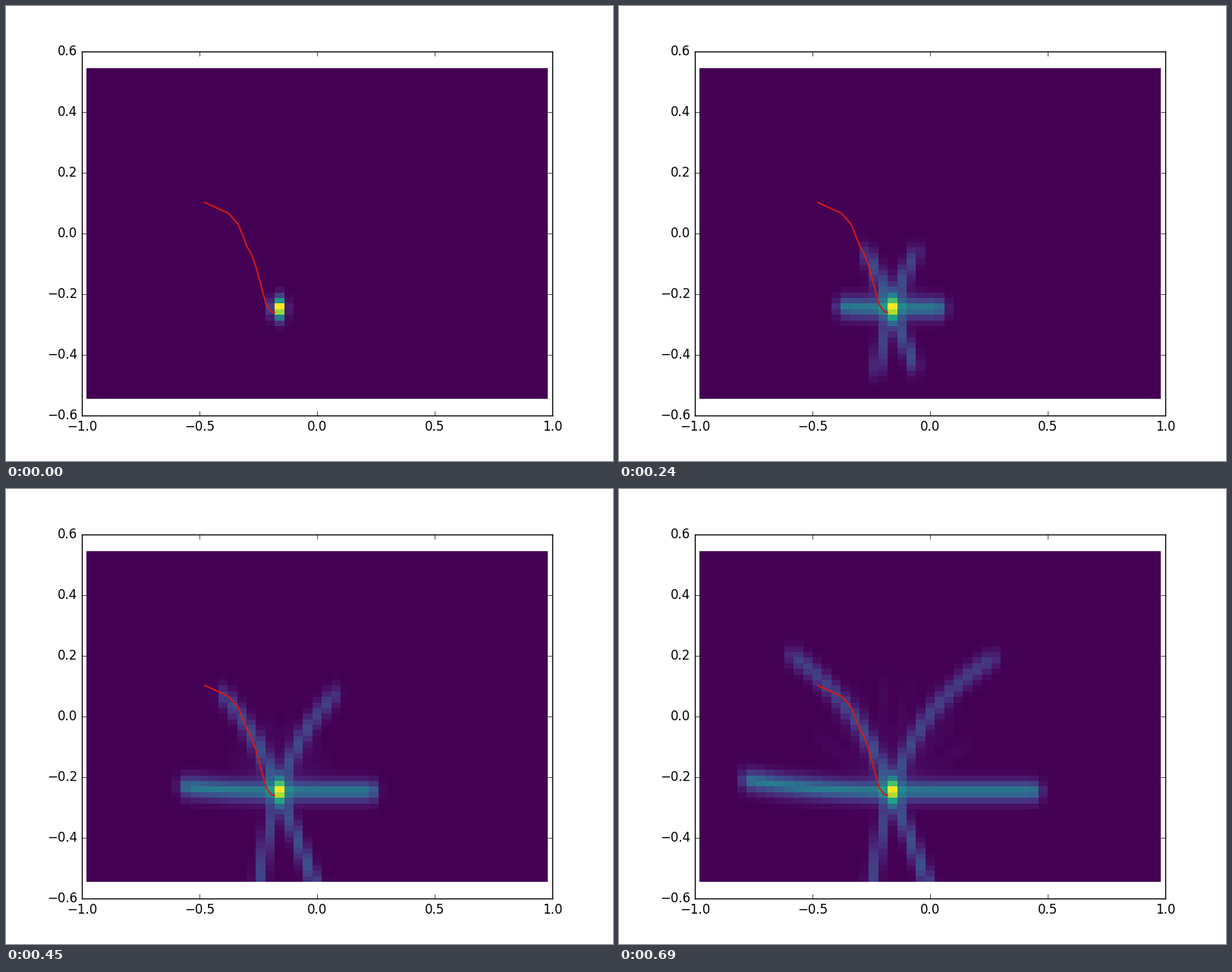
These frames come from a looping animation (800x600 px, 720 ms). A matplotlib script:

```python
import numpy as np
import matplotlib.pyplot as plt
from matplotlib.animation import FuncAnimation

FRAMES, INTERVAL = 24, 30
SUBSTEPS = 4
COLS, ROWS = 49, 59
W, H = 0.98, 0.545
START = (-0.1645, -0.2465)
SPEED = 0.027              # axis units per frame
SPREAD_X, SPREAD_Y, SHARP_Y = 0.0187, 0.025, 0.009

# heading and turn per frame, in degrees
BEAMS = [(0, 0), (180, -0.3), (114, 1.7), (68, -2), (-63, 0), (-110, 0.9)]

plt.rcParams.update({"font.family": "DejaVu Sans", "ytick.alignment": "center"})
fig = plt.figure(figsize=(8, 6), dpi=100, facecolor="white")
ax = fig.add_axes([0.125, 0.1, 0.775, 0.8])
ax.set(xlim=(-1, 1), ylim=(-0.6, 0.6))
ax.set_xticks(np.linspace(-1, 1, 5))
ax.set_yticks(np.linspace(-0.6, 0.6, 7))
ax.tick_params(direction="in", length=4, width=0.5, pad=4, labelsize=12,
               top=True, right=True)
for spine in ax.spines.values():
    spine.set_linewidth(1.0)


def tick_label(value, _):
    return f"{round(value, 1) + 0.0:.1f}".replace("-", "\u2212")


ax.xaxis.set_major_formatter(tick_label)
ax.yaxis.set_major_formatter(tick_label)

x_edges = np.linspace(-W, W, COLS + 1)
y_edges = np.linspace(-H, H, ROWS + 1)
x_mid = (x_edges[:-1] + x_edges[1:]) / 2
y_mid = (y_edges[:-1] + y_edges[1:]) / 2


def bell(distance, spread):
    return np.exp(-((distance / spread) ** 2) / 2)


def deposits(heading, turn, speed, weight):
    """Mass left on the grid at every substep of one curved beam."""
    t = np.arange((FRAMES - 1) * SUBSTEPS + 2) / SUBSTEPS
    mean_heading = np.radians(heading + turn * t / 2)
    dx = x_mid - (START[0] + speed * t * np.cos(mean_heading))[:, None]
    dy = y_mid - (START[1] + speed * t * np.sin(mean_heading))[:, None]
    across = bell(dx, SPREAD_X)
    up = bell(dy, SPREAD_Y) + 0.3 * bell(dy, SHARP_Y)
    return weight * up[:, :, None] * across[:, None, :]


# main beams, strongest when level, plus a faint slow fan above them
mass = sum(deposits(a, turn, SPEED, abs(np.cos(np.radians(a))) ** 0.8)
           for a, turn in BEAMS)
mass += sum(deposits(a, 0, 0.6 * SPEED, 0.025)
            for a in np.linspace(25, 150, 8))
total = np.cumsum(mass, axis=0)


def density(n):
    grid = total[n * SUBSTEPS + 1]
    return grid / grid.max()


mesh = ax.pcolormesh(x_edges, y_edges, density(0), cmap="viridis",
                     vmin=0, vmax=1)
path_x = [-0.477, -0.377, -0.335, -0.297, -0.281, -0.261, -0.216, -0.194, -0.181]
path_y = [0.102, 0.067, 0.03, -0.045, -0.065, -0.107, -0.235, -0.258, -0.26]
ax.plot(path_x, path_y, color="#d81a14", lw=1.4)


def update(n):
    mesh.set_array(density(n))
    return (mesh,)


anim = FuncAnimation(fig, update, frames=FRAMES, interval=INTERVAL,
                     repeat=True, repeat_delay=0, blit=False)
plt.show()
```
